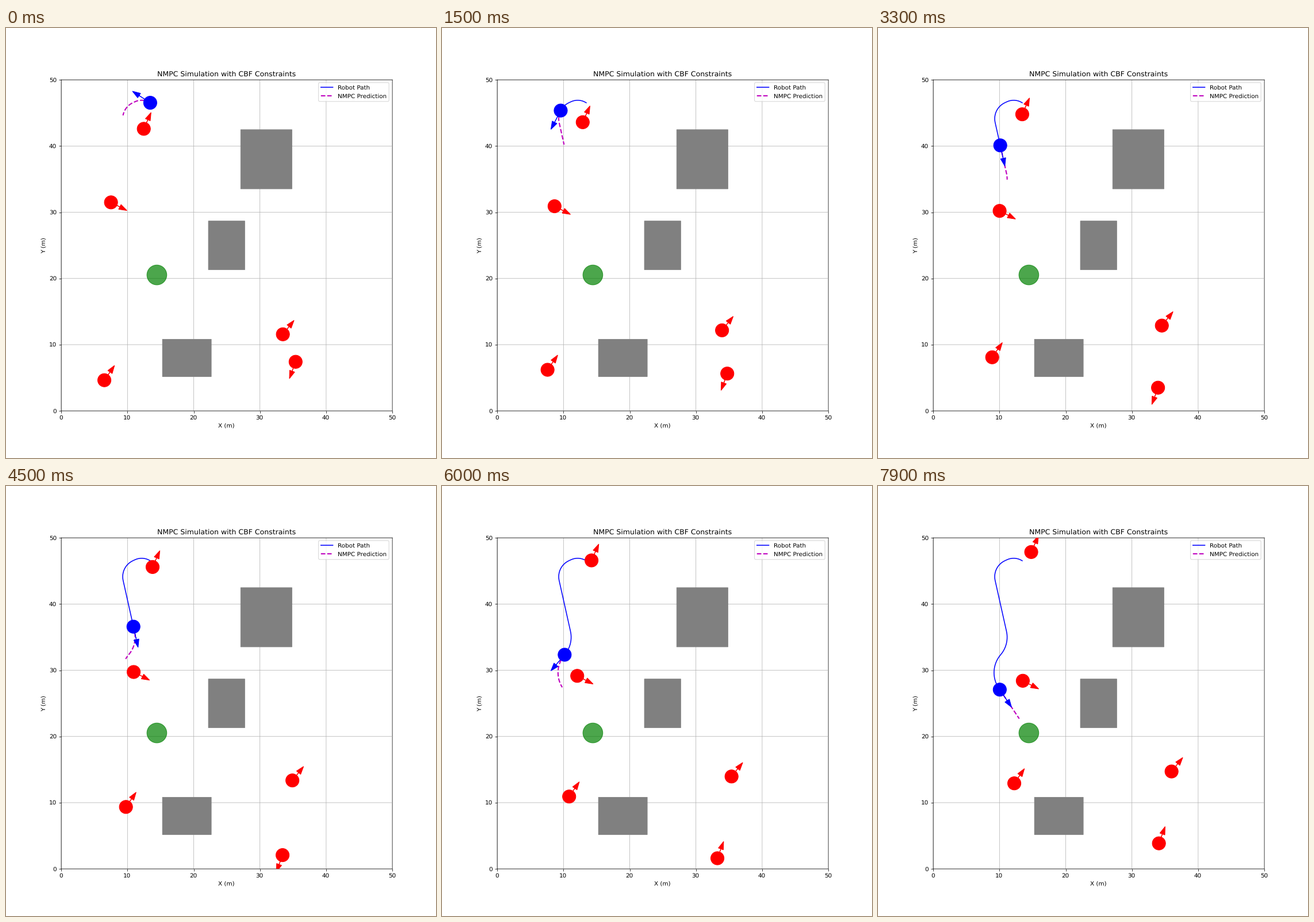
A matplotlib script for the animation above (8 s loop, 748 by 748 pixels).

```python
import numpy as np
import matplotlib.pyplot as plt
from matplotlib.animation import FuncAnimation
from matplotlib.patheffects import Stroke

FRAMES = 80
STEP = 0.3        # robot travel per frame, m
HORIZON = 17.6    # prediction length in steps
BOUNCE = 55       # steps before the last mover turns back

# the robot turns evenly between these (step, heading in degrees) points
TURNS = [(0, 147), (8, 205), (9.2, 205), (21.2, 282.6),
         (47.4, 282.6), (60, 229.4), (78, 303.8)]

# x, y, velocity per frame
MOVERS = [
    (12.5, 42.5, 0.0295, 0.0665),
    (7.5, 31.5, 0.0761, -0.0390),
    (6.5, 4.5, 0.0725, 0.1049),
    (33.5, 11.5, 0.0319, 0.0398),
    (35.5, 7.5, -0.0438, -0.1184),
]

# centre x, centre y, width, height
BLOCKS = [(31, 38, 7.75, 8.95), (25, 25, 5.5, 7.37), (19, 8, 7.38, 5.65)]

# thin, unsnapped lines give the soft look of a scaled-down plot
THIN = 0.72
plt.rcParams.update({
    "path.snap": False, "text.hinting": "none",
    "axes.linewidth": THIN, "grid.linewidth": THIN,
    "xtick.major.width": THIN, "ytick.major.width": THIN,
})


def heading(t):
    return np.radians(np.interp(t, *zip(*TURNS)))


# integrate the heading into a fine path
DT = 0.05
times = np.arange(0, FRAMES + 20, DT)
mid = heading(times[:-1] + DT / 2)
xs = 13.5 + np.append(0, np.cumsum(np.cos(mid))) * STEP * DT
ys = 46.5 + np.append(0, np.cumsum(np.sin(mid))) * STEP * DT


def route(t):
    return np.interp(t, times, xs), np.interp(t, times, ys)


def mover_state(x, y, vx, vy, k, bounces):
    """Position and travel direction after k + 1 steps."""
    n, sign = k + 1, 1
    if bounces and n > BOUNCE:
        n, sign = 2 * BOUNCE + 1 - n, -1
    speed = sign * np.hypot(vx, vy)
    return x + vx * n, y + vy * n, vx / speed, vy / speed


fig, ax = plt.subplots(figsize=(10, 10), dpi=74.8)
ax.set_xlim(0, 50)
ax.set_ylim(0, 50)
ax.set_aspect("equal")
ax.grid(True)
ax.set_title("NMPC Simulation with CBF Constraints")
ax.set_xlabel("X (m)")
ax.set_ylabel("Y (m)")


def nudge(artist, dx):
    """Shift an artist by a fraction of a pixel."""
    artist.set_path_effects([Stroke(offset=(dx, -THIN / 2))])


for spine in ax.spines.values():
    nudge(spine, THIN)
for axis in (ax.xaxis, ax.yaxis):
    for tick in axis.get_major_ticks():
        nudge(tick.gridline, THIN)
        nudge(tick.tick1line, THIN)


def disc(xy, r, color, **kw):
    return ax.add_patch(plt.Circle(xy, r, color=color, zorder=3, **kw))


def pointer(color):
    return ax.arrow(0, 0, 1, 0, head_width=0.8, head_length=1.2,
                    fc=color, ec=color, zorder=4)


for cx, cy, w, h in BLOCKS:
    block = plt.Rectangle((cx - w / 2, cy - h / 2), w, h,
                          color="gray", lw=THIN, zorder=3)
    nudge(ax.add_patch(block), THIN / 2)
disc((14.5, 20.5), 1.5, "green", alpha=0.7)

trail, = ax.plot([], [], "b-", lw=1.5, label="Robot Path")
plan, = ax.plot([], [], "m--", lw=2, label="NMPC Prediction")
robot, robot_arrow = disc((0, 0), 1, "blue"), pointer("blue")
movers = [(disc((0, 0), 1, "red"), pointer("red")) for _ in MOVERS]
ax.legend(loc="upper right")


def place(circle, arrow, x, y, dx, dy, length):
    circle.center = x, y
    arrow.set_data(x=x, y=y, dx=length * dx, dy=length * dy)


def update(k):
    trail.set_data(*route(np.arange(k + 1)))
    plan.set_data(*route(k + np.linspace(0, HORIZON, 30)))
    ang = heading(k)
    place(robot, robot_arrow, *route(k), np.cos(ang), np.sin(ang), 2.0)
    for i, (circle, arrow) in enumerate(movers):
        state = mover_state(*MOVERS[i], k, bounces=i == len(MOVERS) - 1)
        place(circle, arrow, *state, 1.5)
    return []


anim = FuncAnimation(fig, update, frames=FRAMES, interval=100,
                     repeat=True, repeat_delay=0, blit=False)
plt.show()
```
